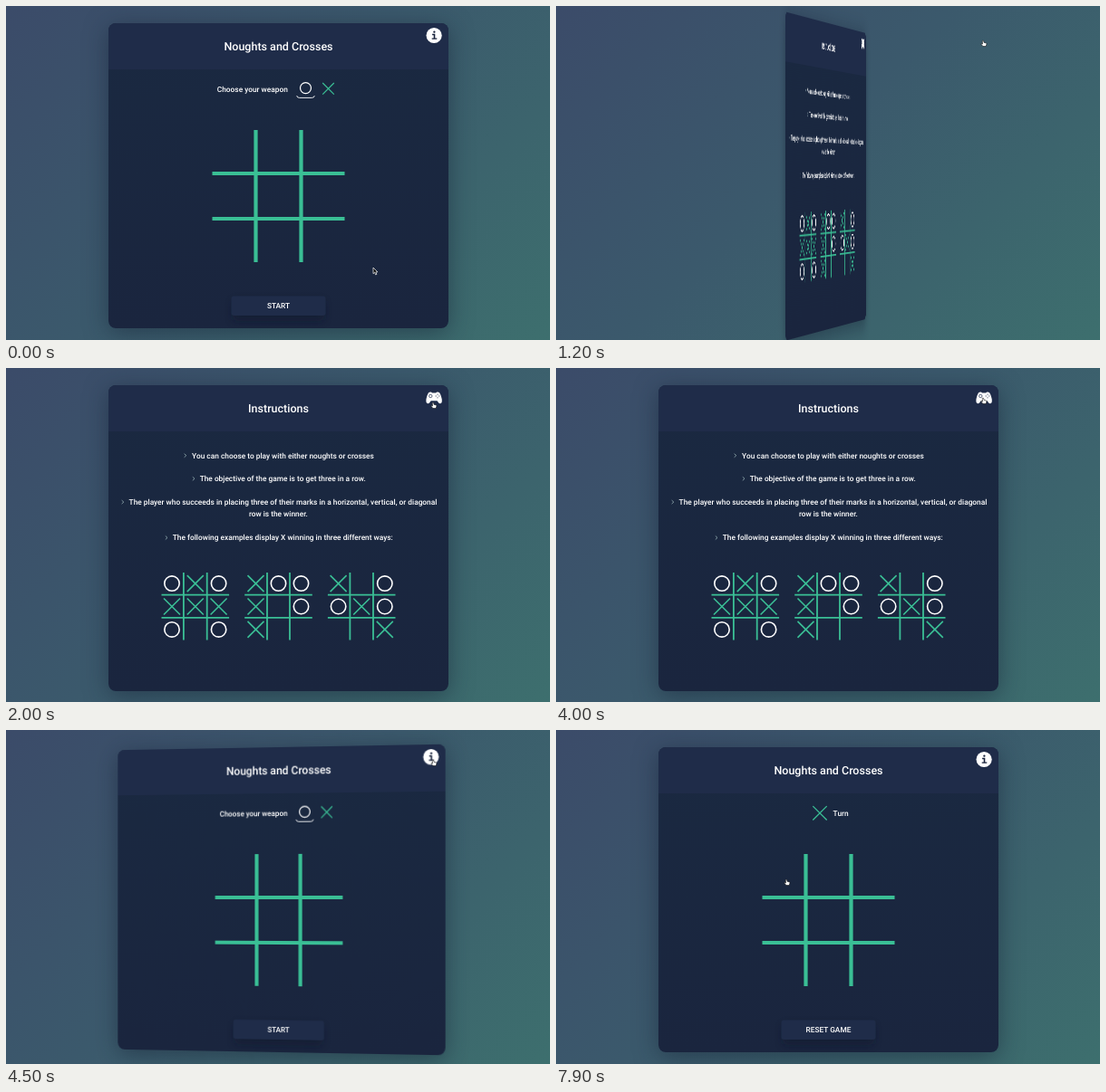
Animation, 600 px wide and 369 px high, one loop 8000 ms. Source, as an HTML page:

```html
<!DOCTYPE html>
<html lang="en">
<head>
<meta charset="utf-8">
<title>Noughts and Crosses</title>
<style>
  html, body { margin: 0; width: 100%; height: 100%; overflow: hidden; }
  body { position: relative; background: linear-gradient(135deg, #3b4b69, #3b596c 45%, #3d6f6e); }
  #scene { position: absolute; left: 112.5px; top: 18.5px; width: 375px; height: 337.5px; perspective: 2604px; }
  #card { width: 100%; height: 100%; transform-style: preserve-3d; }
  .face {
    position: absolute; inset: 0; width: 375px; height: 337.5px; border-radius: 8px;
    backface-visibility: hidden; background: linear-gradient(#1a2941, #1a253e);
    box-shadow: 0 5px 26px rgba(20, 32, 52, .5);
  }
  #back { transform: rotateY(180deg); }
  #cursor { position: absolute; inset: 0; width: 600px; height: 369px; }
  text {
    font: 500 8.333px Roboto, Arial, sans-serif; fill: #fff;
    text-anchor: middle; text-rendering: geometricPrecision;
  }
  .title { font-size: 12.5px; }
  .green { stroke: #3abf95; fill: none; }
  .white { stroke: #fff; fill: none; }
</style>
</head>
<body>
<div id="scene"><div id="card">
  <svg id="front" class="face" viewBox="112.5 18.5 375 337.5"></svg>
  <svg id="back" class="face" viewBox="112.5 18.5 375 337.5"></svg>
</div></div>
<svg id="cursor" viewBox="0 0 600 369">
  <path id="arrow" d="M0 0V6.7L1.6 5.3 2.7 7.9 3.9 7.4 2.8 4.9H4.9Z" fill="#111" stroke="#fff" stroke-width=".7"/>
  <path id="hand" d="M-.8 .5Q0-.3.7.5L1 2.3 3.4 2.9Q4.1 3.2 3.9 4.2L3.2 6.6H-.1L-2.1 4.1Q-2.2 3.2-1.3 3.5L-.5 4Z" fill="#fff" stroke="#111" stroke-width=".6"/>
</svg>
<script>
const LOOP = 8000;
const FLIP = { out: 951, home: 4017, length: 750 };
const PICK_X = 5950, START = 6900;
// Pointer stops: time, x, y
const STOPS = [
  [100, 405, 289], [700, 471, 38], [2000, 471, 38], [2350, 300, 160], [2550, 141, 215],
  [2700, 190, 290], [2800, 177, 268], [3150, 300, 190], [3600, 471, 33], [5450, 471, 33],
  [5800, 354, 90], [6000, 354, 90], [6300, 315, 310], [6500, 315, 310], [6700, 302, 334],
  [7300, 302, 334], [7850, 254, 165]
];
const $ = id => document.getElementById(id);

const text = (x, y, s, attrs = '') => `<text x="${x}" y="${y}" ${attrs}>${s}</text>`;
const cross = (x, y, r, w) =>
  `<path class="green" stroke-width="${w}" d="M${x - r} ${y - r}l${2 * r} ${2 * r}m0 ${-2 * r}l${-2 * r} ${2 * r}"/>`;
const nought = (x, y, r, w) => `<circle class="white" cx="${x}" cy="${y}" r="${r}" stroke-width="${w}"/>`;
const grid = (x, y, px, py, half, w) => {
  const lines = [-.5, .5].map(k =>
    `M${x + k * px} ${y - half}v${2 * half}M${x - half} ${y + k * py}h${2 * half}`).join('');
  return `<path class="green" stroke-width="${w}" d="${lines}"/>`;
};
const header = title =>
  `<rect x="112" y="18" width="376" height="51.5" fill="#1f2c49"/>` + text(300, 48.5, title, 'class="title"');

// Example board: nine characters, row by row
const board = (x, pitch, marks) => grid(x, 262.8, pitch, 25.3, 37.3, 1.8) +
  [...marks].map((m, i) => {
    const cx = x + (i % 3 - 1) * pitch, cy = 263 + (Math.floor(i / 3) - 1) * 25.4;
    return m === 'X' ? cross(cx, cy, 9, 1.6) : m === 'O' ? nought(cx, cy, 8.2, 1.6) : '';
  }).join('');

const bullet = (x, y) =>
  `<path d="M${x - 1.2} ${y - 2}l2.2 2-2.2 2" fill="none" stroke="#a9c4c6" stroke-width=".7"/>`;

$('front').innerHTML = `
  <defs><filter id="soft" x="-20%" y="-60%" width="140%" height="260%"><feGaussianBlur stdDeviation="4"/></filter></defs>
  ${header('Noughts and Crosses')}
  <circle cx="471.6" cy="32" r="8.6" fill="#fff"/>
  <circle cx="471.9" cy="28.2" r="1.15" fill="#17213a"/>
  <path d="M469.6 30.3h3.2v4.6h2v1.4h-5.6v-1.4h2v-3.2h-1.6z" fill="#17213a"/>
  <g id="choice">
    ${text(271.3, 94.2, 'Choose your weapon')}
    <g id="pickO">${nought(330, 90.8, 6, 1.2)}</g>
    <g id="pickX">${cross(355, 90.8, 6.3, 1.2)}</g>
    <path id="underline" class="white" d="M320.2 98.6q.3 2.3 3 2.3h13.6q2.7 0 3-2.3" stroke-width=".9"/>
  </g>
  <g id="turn">${cross(290.5, 91.3, 7.7, 1.3)}${text(313.6, 94.2, 'Turn')}</g>
  ${grid(300, 209.5, 50, 50, 73, 4.2)}
  <rect x="250" y="325" width="100" height="22" rx="4" fill="#10192c" opacity=".5" filter="url(#soft)"/>
  <rect x="248" y="320" width="104" height="21.5" rx="3" fill="#1f2c49"/>
  ${text(300, 333.7, 'START', 'id="button"')}`;

$('back').innerHTML = `
  ${header('Instructions')}
  <path d="M466.5 26.3q2-.9 3 .7h4.2q1-1.6 3-.7 2.200 1 3.500 7.500.7 4.500-1.600 5-1.700.2-3.600-3h-6.800q-1.900 3.200-3.600 3-2.300-.5-1.600-5 1.300-6.500 3.500-7.500z" fill="#fff"/>
  <circle cx="467.800" cy="30.500" r="1.700" fill="none" stroke="#1f2c49" stroke-width=".7"/>
  <path d="M475.500 28.200v.9M475.500 31.900v.9M473.200 30.500h.9M476.900 30.500h.9" stroke="#1f2c49" stroke-width="1"/>
  ${bullet(197.3, 96.2)}${text(305, 99, 'You can choose to play with either noughts or crosses')}
  ${bullet(206.5, 121.8)}${text(304.7, 124.7, 'The objective of the game is to get three in a row.')}
  ${bullet(128.3, 147.6)}${text(305, 150.5, 'The player who succeeds in placing three of their marks in a horizontal, vertical, or diagonal')}
  ${text(299.8, 163.6, 'row is the winner.')}
  ${bullet(176.5, 187)}${text(304.8, 189.6, 'The following examples display X winning in three different ways:')}
  ${board(208.3, 25.8, 'OXOXXXO-O')}
  ${board(300, 25, 'XOOX-OX--')}
  ${board(391.7, 25.6, 'X-OOXO--X')}`;

const clamp = v => Math.min(1, Math.max(0, v));
const smooth = v => v * v * (3 - 2 * v);

// The CSS "ease" curve, solved by bisection
function ease(x) {
  if (x <= 0 || x >= 1) return clamp(x);
  const bezier = (s, a, b) => 3 * (1 - s) ** 2 * s * a + 3 * (1 - s) * s * s * b + s ** 3;
  let lo = 0, hi = 1;
  for (let i = 0; i < 24; i++) {
    const mid = (lo + hi) / 2;
    if (bezier(mid, .25, .25) < x) lo = mid; else hi = mid;
  }
  return bezier(lo, .1, 1);
}

function pointer(t) {
  const next = STOPS.findIndex(s => s[0] > t);
  if (next < 1) return (next ? STOPS[STOPS.length - 1] : STOPS[0]).slice(1);
  const [t0, x0, y0] = STOPS[next - 1], [t1, x1, y1] = STOPS[next];
  const k = smooth((t - t0) / (t1 - t0));
  return [x0 + (x1 - x0) * k, y0 + (y1 - y0) * k];
}

function clickable(x, y, home, playing) {
  const inside = (l, t, r, b) => x >= l && x <= r && y >= t && y <= b;
  if (Math.hypot(x - 471.6, y - 32) < 9) return true;
  if (!home) return false;
  return inside(248, 320, 352, 341) ||
    (playing ? inside(227, 137, 373, 282) : inside(320, 80, 365, 101));
}

const show = (id, on) => $(id).setAttribute('display', on ? 'inline' : 'none');
const move = (id, x, y) => $(id).setAttribute('transform', `translate(${x} ${y})`);

function draw(t) {
  const turned = ease((t - FLIP.out) / FLIP.length) - ease((t - FLIP.home) / FLIP.length);
  $('card').style.transform = `rotateY(${-180 * turned}deg)`;

  const picked = t >= PICK_X, playing = t >= START;
  show('choice', !playing);
  show('turn', playing);
  move('pickO', 0, picked ? 0 : -.7);
  move('pickX', 0, picked ? -.7 : 0);
  move('underline', picked ? 25 : 0, 0);
  $('button').textContent = playing ? 'RESET GAME' : 'START';

  const [x, y] = pointer(t);
  const hand = clickable(x, y, turned < .5, playing);
  show('hand', hand);
  show('arrow', !hand);
  move('hand', x, y);
  move('arrow', x, y);
}

const begin = performance.now();
function tick() {
  draw((performance.now() - begin) % LOOP);
  requestAnimationFrame(tick);
}
tick();
</script>
</body>
</html>
```
